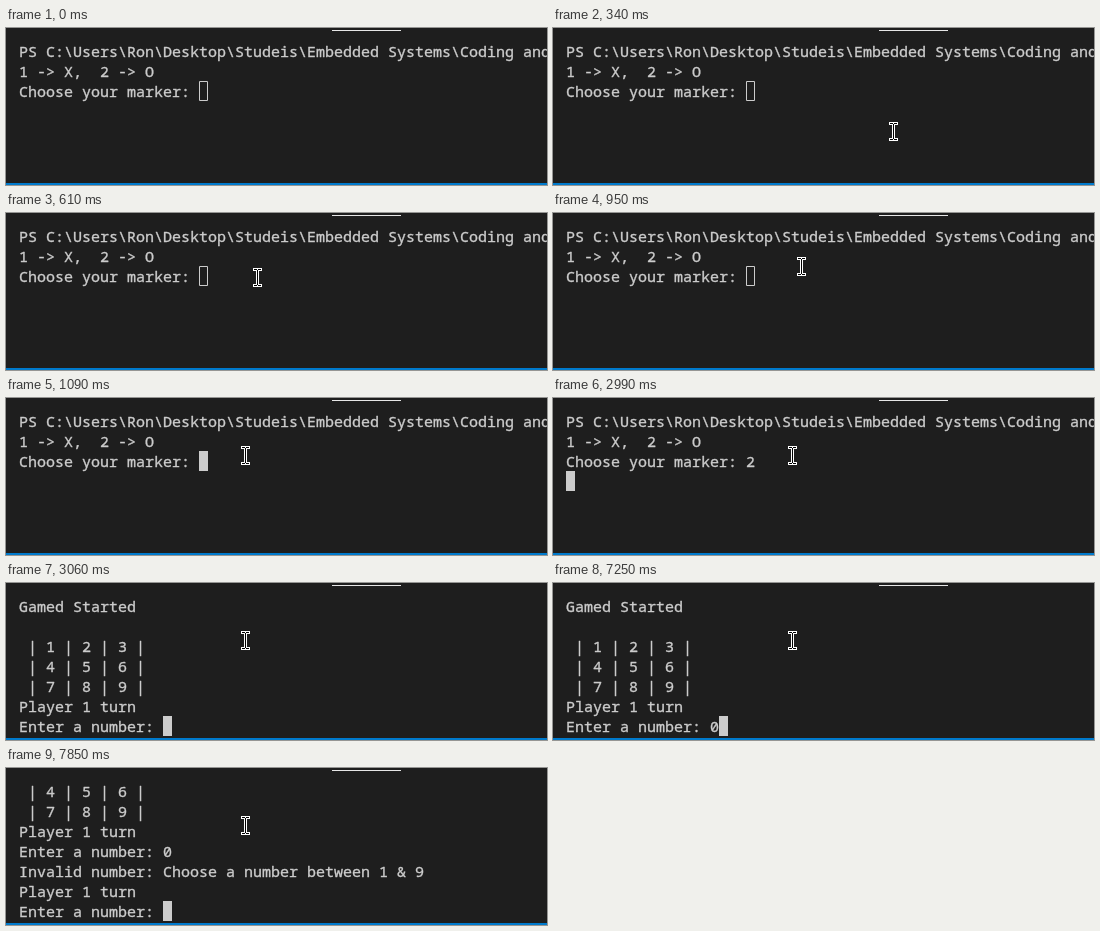
Write an HTML page with a canvas that moves like this. It is 541 px wide and 157 px high and loops after 8 s.

```html
<!DOCTYPE html>
<html lang="en">
<head>
<meta charset="utf-8">
<title>Terminal game</title>
<style>
  html, body { margin: 0; width: 100%; height: 100%; overflow: hidden; background: #1e1e1e; }
  canvas { display: block; }
</style>
</head>
<body>
<canvas id="stage" width="541" height="157"></canvas>
<script>
const ctx = document.getElementById('stage').getContext('2d', { alpha: false });
const LOOP = 8000, LEFT = 13, TOP = 13, CELL = 9, ROW = 20, BASELINE = 16;
const FG = '#cccccc';

const choose = 'Choose your marker: ';
const enter = 'Enter a number: ';
const turn = 'Player 1 turn';
const intro = ['PS C:\\Users\\Ron\\Desktop\\Studeis\\Embedded Systems\\Coding and', '1 -> X,  2 -> O'];
const board = [1, 4, 7].map(n => ` | ${n} | ${n + 1} | ${n + 2} |`);
const game = ['Gamed Started', '', ...board, turn];

// Start time and visible lines; the block cursor follows the last line.
const screens = [
  [0, [...intro, choose]],
  [2690, [...intro, choose + '2']],
  [2990, [...intro, choose + '2', '']],
  [3060, [...game, enter]],
  [7250, [...game, enter + '0']],
  [7850, [...board.slice(1), turn, enter + '0',
    'Invalid number: Choose a number between 1 & 9', turn, enter]]
];

// Time, x, y of the pointer
const pointer = [
  [200, 430, 145], [270, 383, 122], [340, 340, 103], [410, 305, 87],
  [470, 278, 75], [540, 261, 68], [610, 251, 64], [680, 239, 59],
  [750, 228, 54], [820, 235, 52], [950, 248, 53], [1020, 244, 55], [1090, 239, 57]
];

const at = (list, t) => list.filter(item => item[0] <= t).pop();

function rect(color, x, y, w, h) {
  ctx.fillStyle = color;
  ctx.fillRect(x, y, w, h);
}

function drawText(lines, focused) {
  ctx.font = '15px "Noto Sans Mono", "DejaVu Sans Mono", monospace';
  ctx.textBaseline = 'alphabetic';
  ctx.fillStyle = ctx.strokeStyle = FG;
  ctx.lineWidth = 0.35;
  ctx.lineJoin = 'round';
  lines.forEach((line, i) => {
    const y = TOP + i * ROW + BASELINE;
    ctx.fillText(line, LEFT, y);
    ctx.strokeText(line, LEFT, y);
  });

  const last = lines.length - 1;
  const x = LEFT + lines[last].length * CELL, y = TOP + last * ROW;
  if (focused) {
    rect(FG, x, y, CELL, ROW);
  } else {
    ctx.lineWidth = 1;
    ctx.strokeRect(x + 0.5, y + 0.5, CELL - 1, ROW - 1);
  }
}

function drawBeam(x, y) {
  for (const [color, grow] of [['#ffffff', 1], ['#000000', 0]]) {
    const bar = (dx, dy, w, h) =>
      rect(color, x + dx - grow, y + dy - grow, w + 2 * grow, h + 2 * grow);
    for (const dy of [-8, 8]) {
      bar(-3, dy, 3, 1);
      bar(1, dy, 3, 1);
    }
    bar(0, -7, 1, 15);
  }
}

function draw(t) {
  rect('#1e1e1e', 0, 0, 541, 157);
  rect('#e7e7e7', 326, 2, 69, 1);
  rect('#007acc', 0, 155, 541, 2);
  drawText(at(screens, t)[1], t >= 1090);
  const p = at(pointer, t);
  if (p) drawBeam(p[1], p[2]);
}

const start = performance.now();
function tick() {
  draw((performance.now() - start) % LOOP);
  requestAnimationFrame(tick);
}
tick();
</script>
</body>
</html>
```
